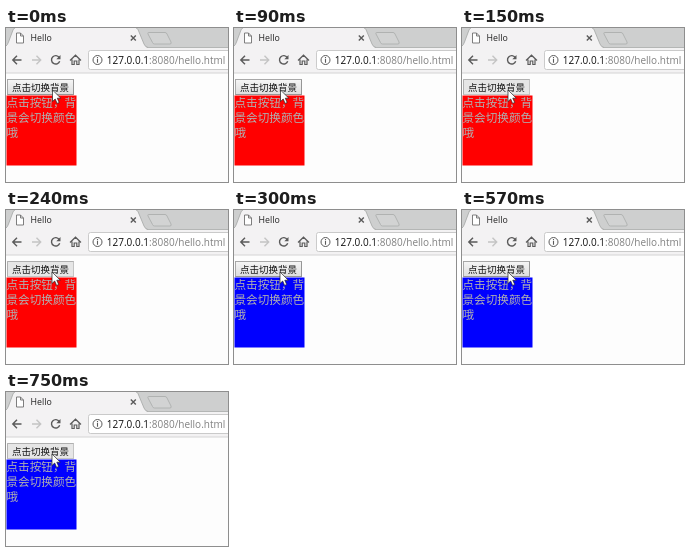
An HTML page for the animation above (0.9 s loop, 222 px wide and 154 px high).

```html
<!DOCTYPE html>
<html lang="zh">
<head>
<meta charset="utf-8">
<title>Hello</title>
<style>
html, body { margin: 0; width: 100%; height: 100%; overflow: hidden; background: #fdfdfd; }
svg { display: block; width: 100vw; height: 100vh; }
.latin { font-family: "Open Sans", "Noto Sans", sans-serif; }
.han { font-family: "Noto Sans CJK SC", "Noto Sans CJK", "Noto Sans CJK JP", sans-serif; }
.icon { fill: none; stroke: #5a5a5a; stroke-width: 1.4; }
</style>
</head>
<body>
<svg viewBox="0 0 222 154">
  <defs>
    <linearGradient id="face" x1="0" y1="0" x2="0" y2="1">
      <stop offset="0" stop-color="#f6f6f6"/>
      <stop offset="1" stop-color="#dddddd"/>
    </linearGradient>
  </defs>

  <!-- tab strip -->
  <rect width="222" height="20" fill="#cecfcf"/>
  <path d="M0 19.5H222" stroke="#b4b6b5"/>
  <path d="M0 20V18Q1.500 17 2.500 14L7 2Q7.800 0 9 0H130Q131.500 0 132.200 2L138 16Q139.200 19 142 20Z" fill="#f3f2f3"/>
  <path d="M0 18Q1.500 17 2.500 14L7 2Q7.800 0 9 0M130 0Q131.500 0 132.200 2L138 16Q139.200 19 142 19.500" fill="none" stroke="#a4a6a5" stroke-width=".8"/>
  <path d="M142.500 4.500H159Q160.500 4.500 161 6L165 14Q165.700 16 164 16H148.500Q147 16 146.500 14.500L142 6Q141.500 4.500 142.500 4.500Z" fill="#d2d3d3" stroke="#a9abaa" stroke-width=".8"/>
  <path d="M10.500 5H14.500L17.500 8V15H10.500ZM14.500 5V8H17.500" fill="#fff" stroke="#707070" stroke-width=".9"/>
  <text class="latin" x="24.500" y="13" font-size="8.800" fill="#222">Hello</text>
  <path class="icon" d="M124.800 7.500L129.800 12.500M129.800 7.500L124.800 12.500"/>

  <!-- toolbar -->
  <rect y="20" width="222" height="25" fill="#f3f2f3"/>
  <path d="M0 45H222" stroke="#d0d0d0" stroke-width=".9"/>
  <path class="icon" d="M15.500 32H7M11 27.800L6.800 32L11 36.200"/>
  <path class="icon" d="M26 32H34.500M30.500 27.800L34.700 32L30.500 36.200" style="stroke:#c4c4c4"/>
  <path class="icon" d="M53.200 29.500A4.200 4.200 0 1 0 53.700 33.200"/>
  <path d="M54.500 27V31.200H50.300Z" fill="#5a5a5a"/>
  <path class="icon" d="M64 32.500L69.500 27.200L75 32.500M66 31.500V36.500H68.200V33H70.800V36.500H73V31.500" style="stroke-width:1.2"/>
  <path d="M222 22.500H84.500Q82.500 22.500 82.500 24.500V39.500Q82.500 41.500 84.500 41.500H222" fill="#fff" stroke="#c6c6c6" stroke-width=".9"/>
  <circle class="icon" cx="91.500" cy="32" r="4.500" style="stroke-width:1"/>
  <path d="M91.500 31V34.800M91.500 29V30.200" stroke="#5a5a5a" stroke-width="1.1"/>
  <text class="latin" x="100.800" y="35.800" font-size="10" fill="#111">127.0.0.1<tspan fill="#808080">:8080/hello.html</tspan></text>

  <!-- page -->
  <rect x=".5" y="67.500" width="70" height="70" id="box"/>
  <g class="han" font-size="11.600" fill="#b0b0b0">
    <text x=".5" y="79.300">点击按钮，背</text>
    <text x=".5" y="94.300">景会切换颜色</text>
    <text x=".5" y="109.300">哦</text>
  </g>
  <rect x="1.500" y="51.500" width="66" height="15" id="button"/>
  <path d="M1.500 66.500V51.500H67.500" fill="none" id="edge"/>
  <text class="han" x="6" y="62.900" font-size="9.500" fill="#111">点击切换背景</text>
  <path id="cursor" d="M0 0V11.500L2.700 9L4.600 13.400L6.700 12.500L4.800 8.200H8.300Z" fill="#fff" stroke="#222" stroke-width=".7"/>
</svg>
<script>
const LOOP = 900;
const $ = id => document.getElementById(id);
const set = (id, attrs) => {
  for (const key in attrs) $(id).setAttribute(key, attrs[key]);
};

function draw(t) {
  const pressed = (t >= 150 && t < 300) || t >= 750;
  set("box", { fill: t < 300 ? "#ff0000" : "#0000ff" });
  set("button", {
    fill: pressed ? "#e6e6e6" : "url(#face)",
    stroke: pressed ? "#c4c4c4" : "#969696"
  });
  set("edge", { stroke: pressed ? "#b0b0b0" : "#a8a8a8" });
  set("cursor", { transform: `translate(${t < 150 ? 46.5 : 46} 62)` });
}

const start = performance.now();
function tick() {
  draw((performance.now() - start) % LOOP);
  requestAnimationFrame(tick);
}
draw(0);
requestAnimationFrame(tick);
</script>
</body>
</html>
```
